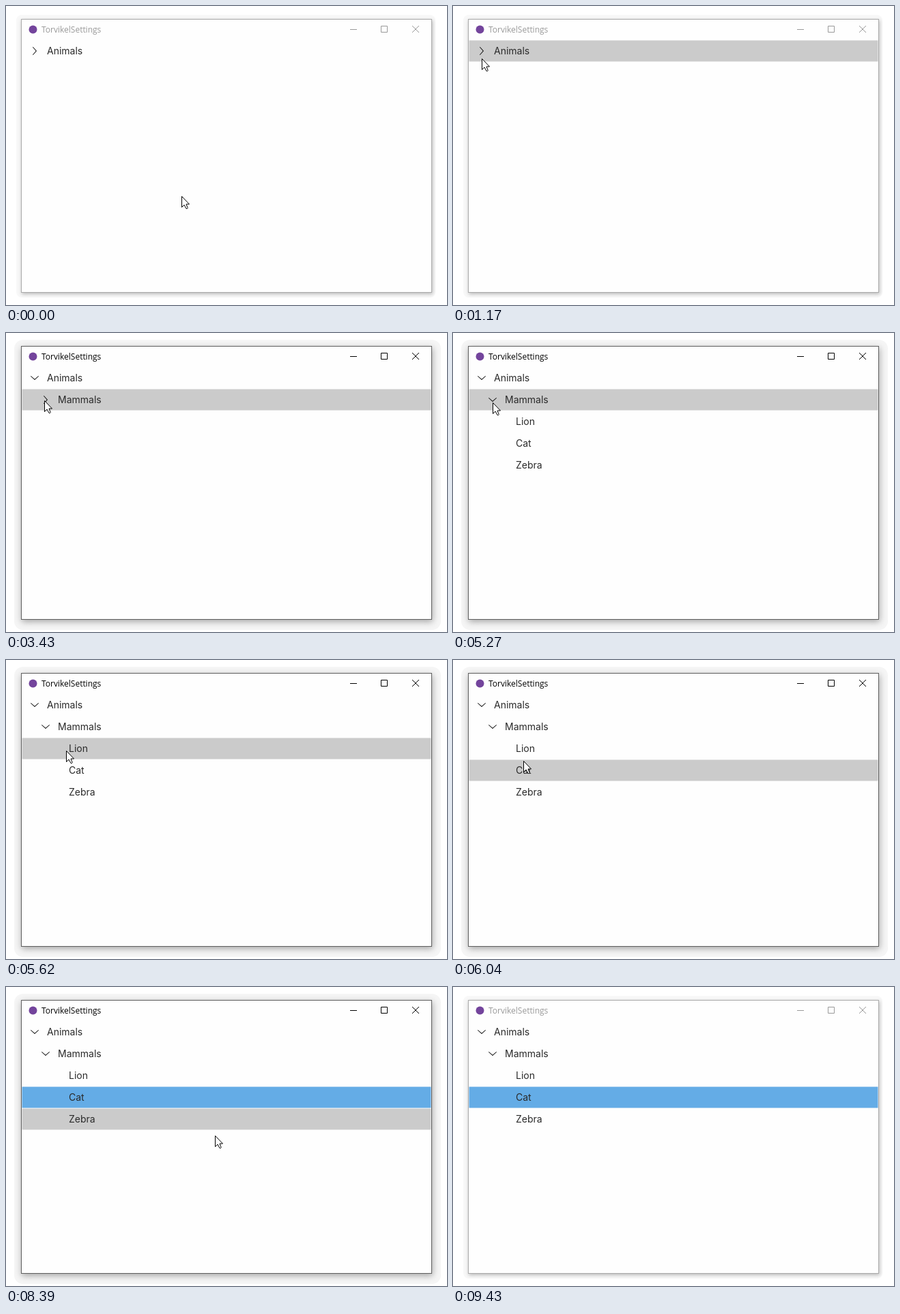
Recreate the animation shown at these times as an HTML page. Size 646x439 px, loop 9.49 s.

```html
<!DOCTYPE html>
<html lang="en">
<head>
<meta charset="utf-8">
<title>Tree view</title>
<style>
  html, body { margin: 0; width: 100%; height: 100%; overflow: hidden; background: #fff; }
  #stage { position: relative; width: 646px; height: 439px; overflow: hidden; }
  #halo { position: absolute; inset: 13px 17px 11px 15px; border-radius: 8px; background: #f8f8f8; }
  #frame {
    position: absolute; left: 22px; top: 19px; width: 602px; height: 402px;
    box-sizing: border-box; background: #fefefe; border: 1px solid #aaa;
    box-shadow: 1px 2px 5px rgba(0, 0, 0, .25);
  }
  .active #halo { inset: 10px 9px 3px 12px; border-radius: 13px; background: #f5f5f5; }
  .active #frame { border-color: #5e5e5e; box-shadow: 1px 3px 9px rgba(0, 0, 0, .32); }
  svg { position: absolute; left: 0; top: 0; }
  #bar { color: #999; font: 12px "Open Sans", "Noto Sans", sans-serif; }
  .active #bar { color: #000; }
  #tree { font: 14px Inter, sans-serif; }
  #tree text { fill: #2a2a2a; }
</style>
</head>
<body>
<div id="stage">
  <div id="halo"></div>
  <div id="frame"></div>
  <svg width="646" height="439" viewBox="0 0 646 439">
    <g id="bar">
      <circle cx="39.5" cy="34.5" r="6" fill="#73449c"/>
      <text x="52" y="39" fill="currentColor">TorvikelSettings</text>
      <path d="M504 34.5h10M549.5 29.5h9v9h-9zM595 29l10 10M605 29l-10 10" fill="none" stroke="currentColor"/>
    </g>
    <g id="tree"></g>
    <path id="cursor" d="M.5 .5V16.5L4 13 7 18.5H8.5L9.2 17.5 7 12H11.5Z" fill="#fff" stroke="#000"/>
  </svg>
</div>
<script>
const LOOP = 9490, TICK = 60, ROW = 32, TOP = 50, INDENT = 16;
const ACTIVATE = 2200, DEACTIVATE = 9430, SELECT = 7150;
const OPEN_AT = [2320, 4290]; // by depth
const HOVER = '#cbcbcb', SELECTED = '#64ace6';
const COLLAPSED = 'M1 0L10 10 1 20 0 19 8 10 0 1Z';
const EXPANDED = 'M0 1L10 10 20 1 19 0 10 8 1 0Z';

// Pointer waypoints: time, x, y
const path = [
  [250, 257, 279], [1170, 42, 77], [1580, 41, 67],
  [2710, 41, 67], [2830, 48, 79], [3430, 56, 99], [3870, 58, 99],
  [4790, 58, 99], [4840, 57, 101],
  [5250, 57, 101], [6040, 103, 148], [6600, 104, 159],
  [8220, 104, 159], [8390, 306, 218], [8810, 515, 445],
];

const $ = id => document.getElementById(id);

function add(parent, tag, attrs) {
  const node = document.createElementNS('http://www.w3.org/2000/svg', tag);
  for (const key in attrs) node.setAttribute(key, attrs[key]);
  return parent.appendChild(node);
}

const rows = ['Animals', 'Mammals', 'Lion', 'Cat', 'Zebra'].map((label, i) => {
  const depth = Math.min(i, OPEN_AT.length);
  const left = depth * INDENT;
  const g = add($('tree'), 'g', { transform: `translate(0 ${TOP + i * ROW})` });
  const back = add(g, 'rect', { x: 23.5, y: .5, width: 599, height: 31 });
  add(g, 'text', { x: 60 + left, y: 21 }).textContent = label;
  const chevron = OPEN_AT[depth] && add(g, 'path', {});
  return { label, left, g, back, chevron, shown: OPEN_AT[depth - 1] || 0, opened: OPEN_AT[depth] };
});

// Eases out towards each waypoint, in steps of one tick that land on it.
function pointerAt(t) {
  const next = path.findIndex(p => p[0] >= t);
  if (next < 1) return (next ? path[path.length - 1] : path[0]).slice(1);
  const [t0, x0, y0] = path[next - 1], [t1, x1, y1] = path[next];
  const stepped = t1 - Math.ceil((t1 - t) / TICK) * TICK;
  const u = Math.max(0, (stepped - t0) / (t1 - t0));
  const k = Math.sin(u * Math.PI / 2);
  return [Math.round(x0 + (x1 - x0) * k), Math.round(y0 + (y1 - y0) * k)];
}

function render(t) {
  $('stage').className = t >= ACTIVATE && t < DEACTIVATE ? 'active' : '';
  $('cursor').setAttribute('transform', `translate(${pointerAt(t)})`);

  // The hover highlight trails the pointer by one tick.
  const hovered = Math.floor((pointerAt(t - TICK)[1] - TOP) / ROW);
  rows.forEach((row, i) => {
    const selected = row.label === 'Cat' && t >= SELECT;
    row.g.style.display = t >= row.shown ? '' : 'none';
    row.back.setAttribute('fill', selected ? SELECTED : i === hovered ? HOVER : 'none');
    if (!row.chevron) return;
    const open = t >= row.opened;
    const [x, y] = open ? [36, 13] : [39, 10];
    row.chevron.setAttribute('d', open ? EXPANDED : COLLAPSED);
    row.chevron.setAttribute('transform', `translate(${x + row.left} ${y}) scale(.6)`);
  });
}

const start = performance.now();
function frame() {
  render((performance.now() - start) % LOOP);
  requestAnimationFrame(frame);
}
frame();
</script>
</body>
</html>
```
